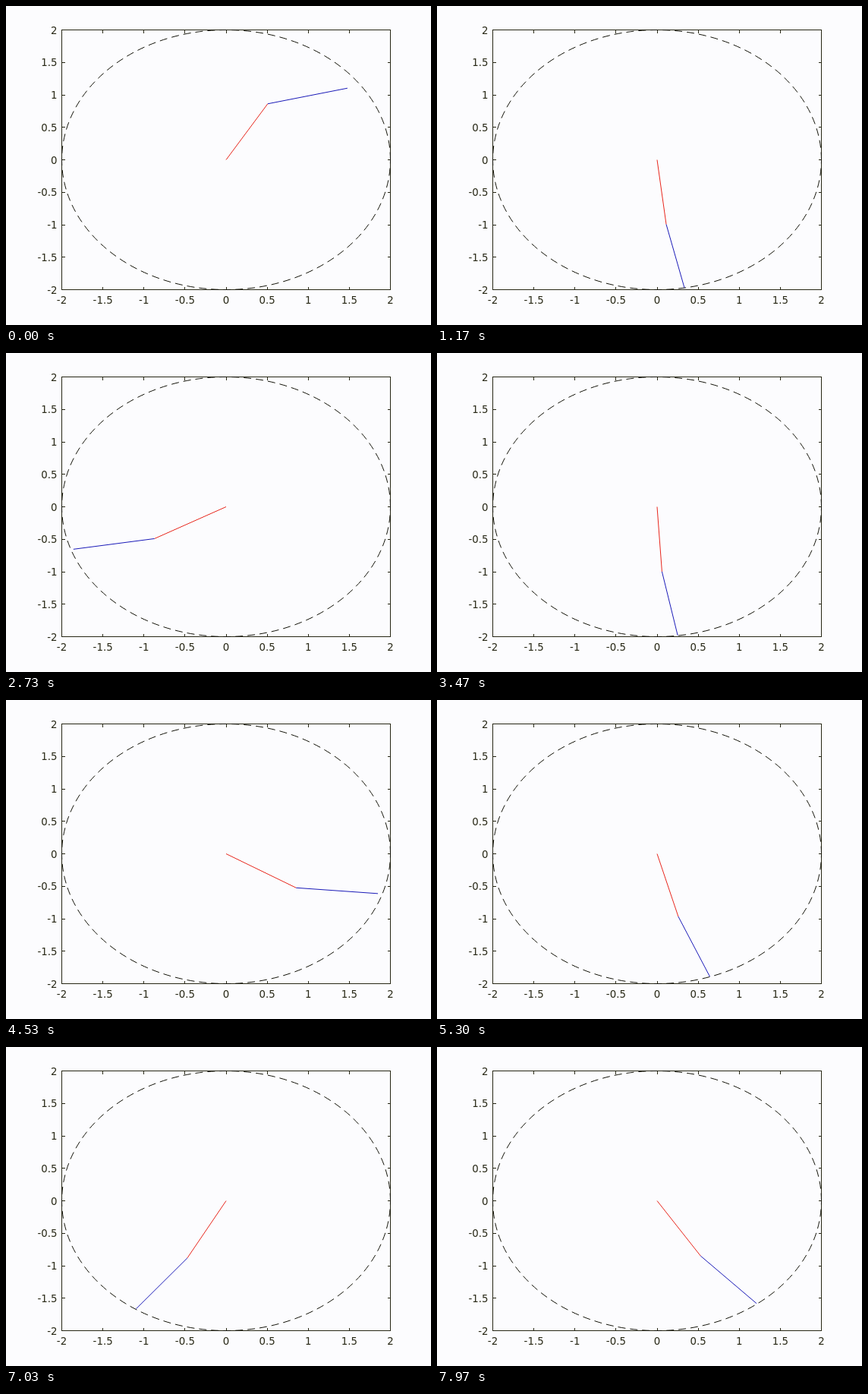
Animation, 560 px wide and 420 px high, one loop 8 s. Source, as an HTML page:

```html
<!DOCTYPE html>
<html lang="en">
<head>
<meta charset="utf-8">
<title>Double pendulum</title>
<style>
  html, body { margin: 0; width: 100%; height: 100%; overflow: hidden; background: #fcfcfe; }
  svg { display: block; width: 560px; height: 420px; }
  line, path, rect { fill: none; stroke-width: 1; }
  .axis { stroke: #262614; shape-rendering: crispEdges; }
  .rim { stroke: #121208; stroke-dasharray: 10 6; }
  text { font: 13.33px "DejaVu Sans", sans-serif; fill: #2a2a18; }
</style>
</head>
<body>
<svg viewBox="0 0 560 420">
  <g id="plot"></g>
  <line id="upper" stroke="#e8261c"/>
  <line id="lower" stroke="#1a1ab8"/>
</svg>
<script>
const LOOP = 8000, STEP = 100 / 3, LAST_STEP = 239;
const LEFT = 73.5, RIGHT = 506.5, TOP = 31.5, BOTTOM = 373.5, TICK = 4;
const px = x => (LEFT + RIGHT) / 2 + x * (RIGHT - LEFT) / 4;
const py = y => (TOP + BOTTOM) / 2 - y * (BOTTOM - TOP) / 4;

// Turning points of each rod: step and angle from straight down in degrees.
const UPPER = [[-10, 159.6], [66, -78.8], [133.6, 58.9], [191.4, -49.5], [253, 43.3]];
const LOWER = [[-8, 117], [19.5, 49.9], [67, -104.5], [132.2, 86.4], [192, -66], [253, 58.4]];

function add(tag, attrs, text = '') {
  const el = document.createElementNS('http://www.w3.org/2000/svg', tag);
  for (const name in attrs) el.setAttribute(name, attrs[name]);
  el.textContent = text;
  document.getElementById('plot').append(el);
}

function drawPlot() {
  let ticks = '';
  for (let v = -2; v <= 2; v += 0.5) {
    const x = px(v), y = py(v);
    ticks += `M${x} ${TOP}v${TICK}M${x} ${BOTTOM}v${-TICK}`
           + `M${LEFT} ${y}h${TICK}M${RIGHT} ${y}h${-TICK}`;
    add('text', { x, y: 392, 'text-anchor': 'middle' }, v);
    add('text', { x: 67.5, y: y + 5, 'text-anchor': 'end' }, v);
  }
  add('rect', { class: 'axis', x: LEFT, y: TOP, width: RIGHT - LEFT, height: BOTTOM - TOP });
  add('path', { class: 'axis', d: ticks });
  const arc = `A${px(2) - px(0)} ${py(0) - py(2)} 0 0 0 `;
  add('path', { class: 'rim', d: `M${RIGHT} ${py(0)}${arc}${LEFT} ${py(0)}${arc}${RIGHT} ${py(0)}` });
}

// Half a cosine wave from one turning point to the next, in radians.
function swing(turns, step) {
  const next = turns.findIndex(([at]) => at > step);
  const [t0, from] = turns[next - 1], [t1, to] = turns[next];
  const eased = (1 - Math.cos(Math.PI * (step - t0) / (t1 - t0))) / 2;
  return (from + (to - from) * eased) * Math.PI / 180;
}

function setLine(id, x1, y1, x2, y2) {
  const ends = { x1: px(x1), y1: py(y1), x2: px(x2), y2: py(y2) };
  const el = document.getElementById(id);
  for (const name in ends) el.setAttribute(name, ends[name]);
}

function render(time) {
  // The small lead absorbs the rounding of step times to 10 ms.
  const step = Math.min(LAST_STEP, Math.floor((time % LOOP + 4) / STEP));
  const a = swing(UPPER, step), b = swing(LOWER, step);
  const x = Math.sin(a), y = -Math.cos(a);
  setLine('upper', 0, 0, x, y);
  setLine('lower', x, y, x + Math.sin(b), y - Math.cos(b));
}

drawPlot();
render(0);
let start;
requestAnimationFrame(function tick(now) {
  start ??= now;
  render(now - start);
  requestAnimationFrame(tick);
});
</script>
</body>
</html>
```
